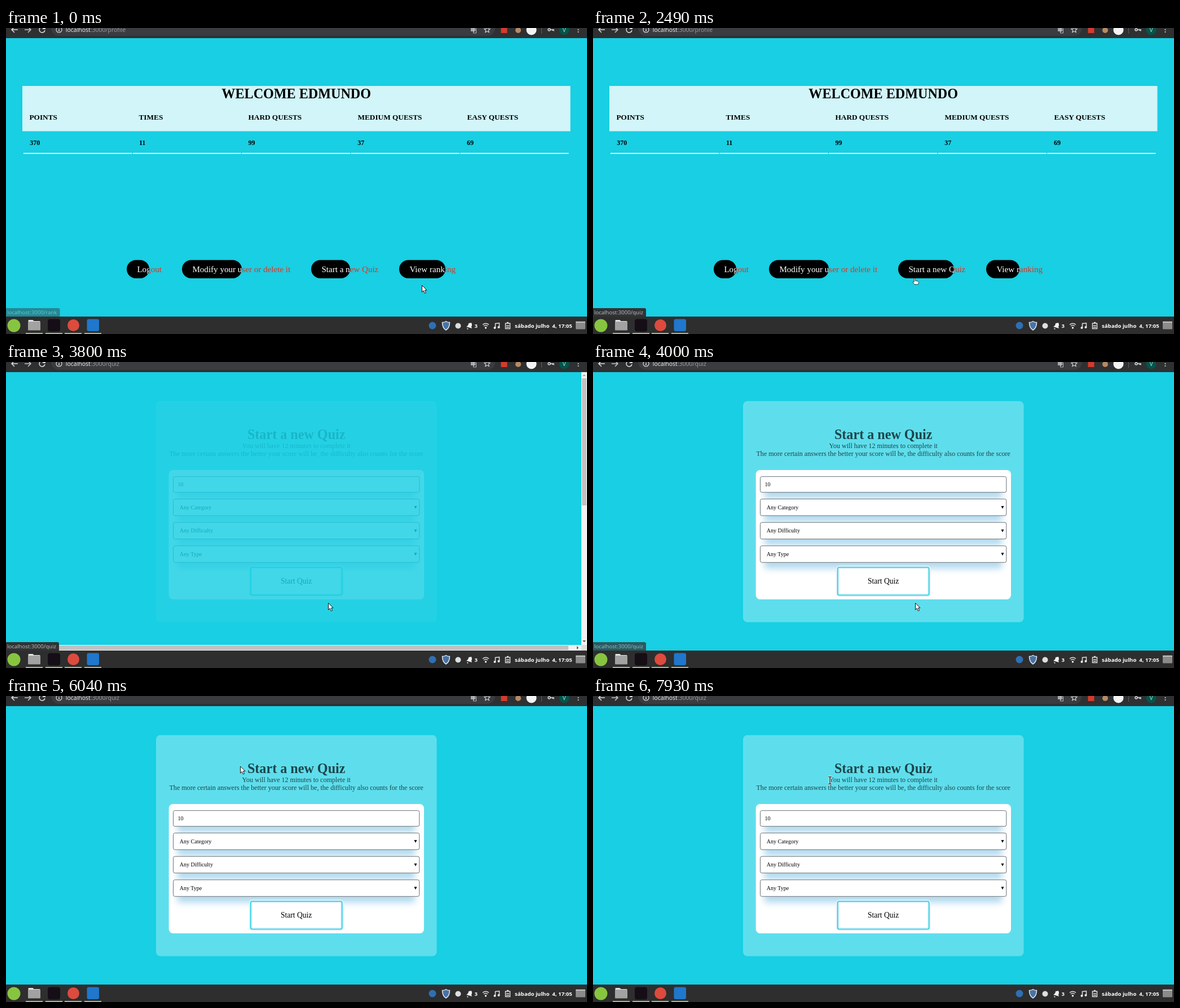
Animation of 1030x544 px, one loop 8 s. Source, as an HTML page:

```html
<!DOCTYPE html>
<html lang="en">
<head>
<meta charset="utf-8">
<title>Quiz profile</title>
<style>
  html, body { margin: 0; width: 100%; height: 100%; overflow: hidden; background: #18cfe3; }
  svg { display: block; width: 1030px; height: 544px; }
  text { white-space: pre; font-family: "Liberation Serif", "Times New Roman", serif; font-size: 12.06px; }
  .ui { font-family: "Open Sans", "Noto Sans", sans-serif; font-size: 9.6px; }
  .url { font-size: 10.5px; fill: #9aa0a6; }
  .mid { text-anchor: middle; }
  .bold { font-weight: 700; }
  .title { font-size: 24.13px; font-weight: 700; text-anchor: middle; }
  .label { font-size: 13.27px; font-weight: 700; }
  .link { font-size: 15.08px; fill: #fff; mix-blend-mode: difference; }
  .field { font-size: 10.05px; }
  .muted { fill: #1c454b; }
  .line { fill: none; stroke: #dcdee0; stroke-width: 1.5; }
  .box { fill: #fff; stroke: #6c7174; }
  .shade { fill: #4aa8d8; opacity: .42; filter: blur(6px); }
</style>
</head>
<body>
<svg viewBox="0 0 1030 544">
  <rect width="1030" height="544" fill="#18cfe3"/>

  <g id="profile">
    <rect x="29" y="103" width="971.5" height="80.5" fill="#d1f5f9"/>
    <text class="title" x="514.7" y="125">WELCOME EDMUNDO</text>
    <g id="table"></g>
    <g id="links"></g>
  </g>

  <g id="quiz">
    <g id="card">
      <rect x="266" y="69.5" width="497.5" height="393" rx="7.5" fill="#fff" opacity=".3"/>
      <g class="muted">
        <text class="title" x="514.7" y="136.5">Start a new Quiz</text>
        <text class="mid" x="514.7" y="153.3">You will have 12 minutes to complete it</text>
        <text class="mid" x="514.7" y="167.2">The more certain answers the better your score will be, the difficulty also counts for the score</text>
      </g>
      <rect x="288.7" y="192" width="452.3" height="230" rx="7.5" fill="#fff"/>
      <g id="fields"></g>
      <rect x="433.7" y="365" width="162" height="49.5" rx="3" fill="#fff" stroke="#dff1fa" stroke-width="6"/>
      <rect x="433.7" y="365" width="162" height="49.5" rx="3" fill="none" stroke="#18cfe0" stroke-width="1.6"/>
      <text class="mid" x="514.6" y="393.8" style="font-size:13.57px">Start Quiz</text>
    </g>
    <g id="scrollbars">
      <path d="M1020 18h10v495H0v-10h1020z" fill="#f1f1f1"/>
      <path d="M1021 29h8v226h-8zM10 504h987v8H10z" fill="#c1c1c1"/>
      <path d="M1020 503h10v10h-10z" fill="#dcdcdc"/>
      <path d="M1022 25l3-3 3 3z" fill="#a3a3a3"/>
      <path d="M1022 495l3 3 3-3zM1012 505l3 3-3 3z" fill="#505050"/>
    </g>
  </g>

  <g id="status">
    <path id="statusBox" fill="#323335"/>
    <text class="ui" id="statusText" x="2" y="509.3" fill="#bcc4c6"></text>
  </g>

  <g id="toolbar">
    <rect width="1030" height="18" fill="#2f3032"/>
    <rect x="80" y="-14" width="787" height="28" rx="14" fill="#3b3c3f"/>
    <path class="line" d="M21 3H10m5-5l-5 5 5 5M68 0a5 5 0 1 0 1 4"/>
    <path d="M70-4v6h-6z" fill="#dcdee0"/>
    <path class="line" d="M33 3h11m-5-5l5 5-5 5" style="stroke:#c4c6c8"/>
    <circle class="line" cx="94" cy="3" r="5" style="stroke-width:1.2"/>
    <path class="line" d="M94 2v4M94-.5v1.2"/>
    <text class="ui url" x="105.8" y="6.8"><tspan fill="#f1f3f4">localhost</tspan><tspan id="path"></tspan></text>
    <rect x="824" y="-3" width="7" height="9" fill="#a5a8ab"/>
    <path class="line" d="M828.500 1h5v8h-5zM829 4h4m-2-2v2q0 2-2 3" style="stroke:#b9bcbe;stroke-width:1"/>
    <path class="line" d="M853-2l1.500 3.300 3.600.4-2.700 2.400.8 3.600-3.200-1.900-3.200 1.900.8-3.600-2.700-2.400 3.600-.4z" style="stroke-width:1.100"/>
    <rect x="877.500" y="-2" width="11" height="11" fill="#d63a2c"/>
    <circle cx="908" cy="4" r="5" fill="#b98a62"/>
    <circle cx="931.500" cy="3.500" r="9" fill="#f4f4f4"/>
    <path d="M949.500-1v11" stroke="#5d5f62"/>
    <circle class="line" cx="963" cy="3" r="2"/>
    <path class="line" d="M965 3h6v2.500m-2-2.500v2"/>
    <circle cx="989.500" cy="3.500" r="9" fill="#02564b"/>
    <text class="ui mid" x="989.500" y="6.500" fill="#d5e5e2">V</text>
    <path d="M1014.500-1v9.500" stroke="#dcdee0" stroke-width="2.200" stroke-linecap="round" stroke-dasharray="0 4"/>
  </g>

  <g id="taskbar">
    <rect y="513" width="1030" height="31" fill="#2e2e2e"/>
    <rect id="active" x="104" y="514" width="30" height="28" fill="#707070"/>
    <path d="M35 543h30m5 0h30m4 0h30m5 0h30" stroke="#9bbf86" stroke-width="2"/>
    <circle cx="14" cy="529" r="11.500" fill="#87c540"/>
    <path d="M39.500 522v-2q0-1 1-1h7l2 2h10q1 0 1 1z" fill="#e3e3e3"/>
    <rect x="39" y="522" width="22" height="15.500" rx="1" fill="#a2a2a2"/>
    <rect x="74" y="517.500" width="22" height="22" rx="4" fill="#150e17"/>
    <circle cx="119.500" cy="528.500" r="10.500" fill="#dc4b3e"/>
    <rect x="143.500" y="517.500" width="21.500" height="21.500" rx="3" fill="#2077cb"/>
    <circle cx="756" cy="529" r="6.500" fill="#2e70b4"/>
    <path d="M780 521.500q3 2 6.500 2 0 10-6.500 13.500-6.500-3.500-6.500-13.500 3.500 0 6.500-2z" fill="#4873a8" stroke="#e3e9ef" stroke-width="1.500"/>
    <circle cx="801.500" cy="529.500" r="5" fill="#dedede"/>
    <path d="M816 531q4-2 4-6l5-1q2 4 0 7l1 3zM817 533l3 2-2 1z" fill="#f2f2f2"/>
    <path class="line" d="M845 527.500q5.500-4.500 11 0m-9 2.500q3.500-3 7 0"/>
    <circle cx="850.500" cy="533" r="1.700" fill="#f2f2f2"/>
    <path class="line" d="M867.500 533v-7.500l7-1v7.500"/>
    <path d="M864.500 533a2 2 0 1 0 4 0 2 2 0 1 0-4 0m7-1a2 2 0 1 0 4 0 2 2 0 1 0-4 0" fill="#f2f2f2"/>
    <path class="line" d="M885.500 525h8v9.500h-8zM888 523.500h3M887 529h5m-5 3h5"/>
    <g class="ui bold" fill="#fff">
      <text class="ui" x="830.500" y="533.300">3</text>
      <text class="ui" x="902" y="533.300">sábado julho  4, 17:05</text>
    </g>
    <rect x="1010" y="521.500" width="17" height="14" rx="1" fill="#8b8b8b"/>
    <path d="M1010 523h17" stroke="#bdbdbd" stroke-width="2"/>
  </g>

  <g id="cursor" stroke-linejoin="round">
    <path id="arrow" d="M.5.5v12l2.800-2.600 2 4.700 2.200-.9-2-4.600h3.600z" fill="#fff" stroke="#111"/>
    <path id="hand" d="M-1 1q1-1 2 0v4l5 1q1.500.5 1 2.500l-.7 3H-.5l-3-4q0-1.500 2.500-.3z" fill="#fff" stroke="#222" stroke-width=".8"/>
    <g id="beam" fill="none">
      <path d="M-2.500-6.500q2.500 0 2.500 1 0-1 2.500-1M0-5.500v11M-2.500 6.500q2.500 0 2.500-1 0 1 2.500 1" stroke="#fff" stroke-width="3"/>
      <path d="M-2.500-6.500q2.500 0 2.500 1 0-1 2.500-1M0-5.500v11M-2.500 6.500q2.500 0 2.500-1 0 1 2.500 1" stroke="#111" stroke-width="1.300"/>
    </g>
  </g>
</svg>

<script>
const LOOP = 8000, PAGE_CHANGE = 3800;
const $ = id => document.getElementById(id);
const show = (id, on) => { $(id).style.display = on ? '' : 'none'; };

const columns = [['POINTS', 370], ['TIMES', 11], ['HARD QUESTS', 99], ['MEDIUM QUESTS', 37], ['EASY QUESTS', 69]];
$('table').innerHTML = columns.map(([name, value], i) => `
  <text class="label" x="${41.5 + i * 194}" y="163.400">${name}</text>
  <text class="bold" x="${42.2 + i * 193.7}" y="208">${value}</text>
  <rect x="${31 + i * 193.6}" y="222" width="192" height="1.800" fill="#fff"/>`).join('');

const links = [['Logout', 214, 254], ['Modify your user or delete it', 312, 418],
  ['Start a new Quiz', 541, 610], ['View ranking', 697, 756]];
$('links').innerHTML = links.map(([name, left, right], i) => `
  <rect id="pill${i}" x="${left}" y="412.500" width="${right - left}" height="32.500" rx="16.250"/>
  <text class="link" x="${left + 18.4}" y="433.600">${name}</text>`).join('');

const fields = ['10', 'Any Category', 'Any Difficulty', 'Any Type'];
$('fields').innerHTML = fields.map((name, i) => {
  const top = i ? 202 + i * 41.6 : 203.7, height = i ? 29.5 : 28;
  const mark = i ? `<path d="M723.500 ${top + 12.5}h5l-2.500 5z"/>` : '';
  return `<rect class="shade" x="304" y="${top + 11}" width="421" height="${height}"/>
    <rect class="box" x="296.500" y="${top}" width="436.300" height="${height}" rx="3"/>
    <text class="field" x="${i ? 307.7 : 304.5}" y="${top + height / 2 + 3.3}">${name}</text>${mark}`;
}).join('');

// Each move: first step, last step, number of steps, waypoints
const moves = [
  [20, 380, 9, [[737, 457], [592, 499]]],
  [670, 710, 3, [[592, 499], [589, 499]]],
  [1420, 1420, 1, [[589, 499], [569, 477]]],
  [1780, 2670, 6, [[569, 477], [571, 428]]],
  [4400, 4620, 2, [[571, 428], [591, 415]]],
  [4840, 6040, 7, [[591, 415], [530, 340], [420, 225], [300, 130], [238, 90], [290, 78], [390, 115], [415, 124.5]]],
  [6240, 6890, 4, [[415, 124.5], [470, 130], [530, 134], [585, 127], [616, 115]]],
  [7110, 7930, 5, [[616, 115], [560, 140], [460, 148], [382, 151], [400, 150], [420, 150]]]
];

function along(points, u) {
  const s = u * (points.length - 1), i = Math.min(Math.floor(s), points.length - 2);
  return [0, 1].map(k => points[i][k] + (points[i + 1][k] - points[i][k]) * (s - i));
}

function cursorAt(t) {
  const move = moves.filter(m => m[0] <= t).pop();
  if (!move) return moves[0][3][0];
  const [start, end, steps, points] = move;
  const step = t >= end ? steps : 1 + Math.floor((t - start) / (end - start) * (steps - 1) + 1e-6);
  return along(points, step / steps);
}

const held = (keys, t) => keys.filter(k => k[0] <= t).pop()[1];
const startEdge = [[0, 610], [2320, 640], [2500, 669], [2670, 685], [2840, 681], [3020, 679]];
const rankEdge = [[0, 779], [20, 772], [65, 766], [110, 761], [155, 758], [200, 756]];
const statusFade = [[0, .45], [20, .35], [65, .2], [110, 0], [2320, 1], [4000, .75], [4200, .2], [4400, 0]];
const cardFade = [[0, 0], [PAGE_CHANGE, .18], [4000, 1]];

function draw(t) {
  const onQuiz = t >= PAGE_CHANGE, target = t < 2000 ? 'rank' : 'quiz';
  show('profile', !onQuiz);
  show('quiz', onQuiz);
  show('scrollbars', t < 4000);
  show('active', t >= 3580 && !onQuiz);
  $('path').textContent = ':3000/' + (onQuiz ? 'quiz' : 'profile');
  $('pill2').setAttribute('width', held(startEdge, t) - 541);
  $('pill3').setAttribute('width', held(rankEdge, t) - 697);
  $('card').style.opacity = held(cardFade, t);

  $('status').style.opacity = held(statusFade, t);
  $('statusText').textContent = 'localhost:3000/' + target;
  $('statusBox').setAttribute('d', `M0 498h${target === 'rank' ? 92.5 : 91}q3 0 3 3v12H0z`);

  const [x, y] = cursorAt(t);
  const hand = !onQuiz && y < 445;
  const beam = onQuiz && x > 417 && x < 612 && y > 116 && y < 169;
  show('hand', hand);
  show('beam', beam);
  show('arrow', !hand && !beam);
  $('cursor').setAttribute('transform', `translate(${x} ${y})`);
}

const began = performance.now();
function tick() {
  draw((performance.now() - began) % LOOP);
  requestAnimationFrame(tick);
}
tick();
</script>
</body>
</html>
```
